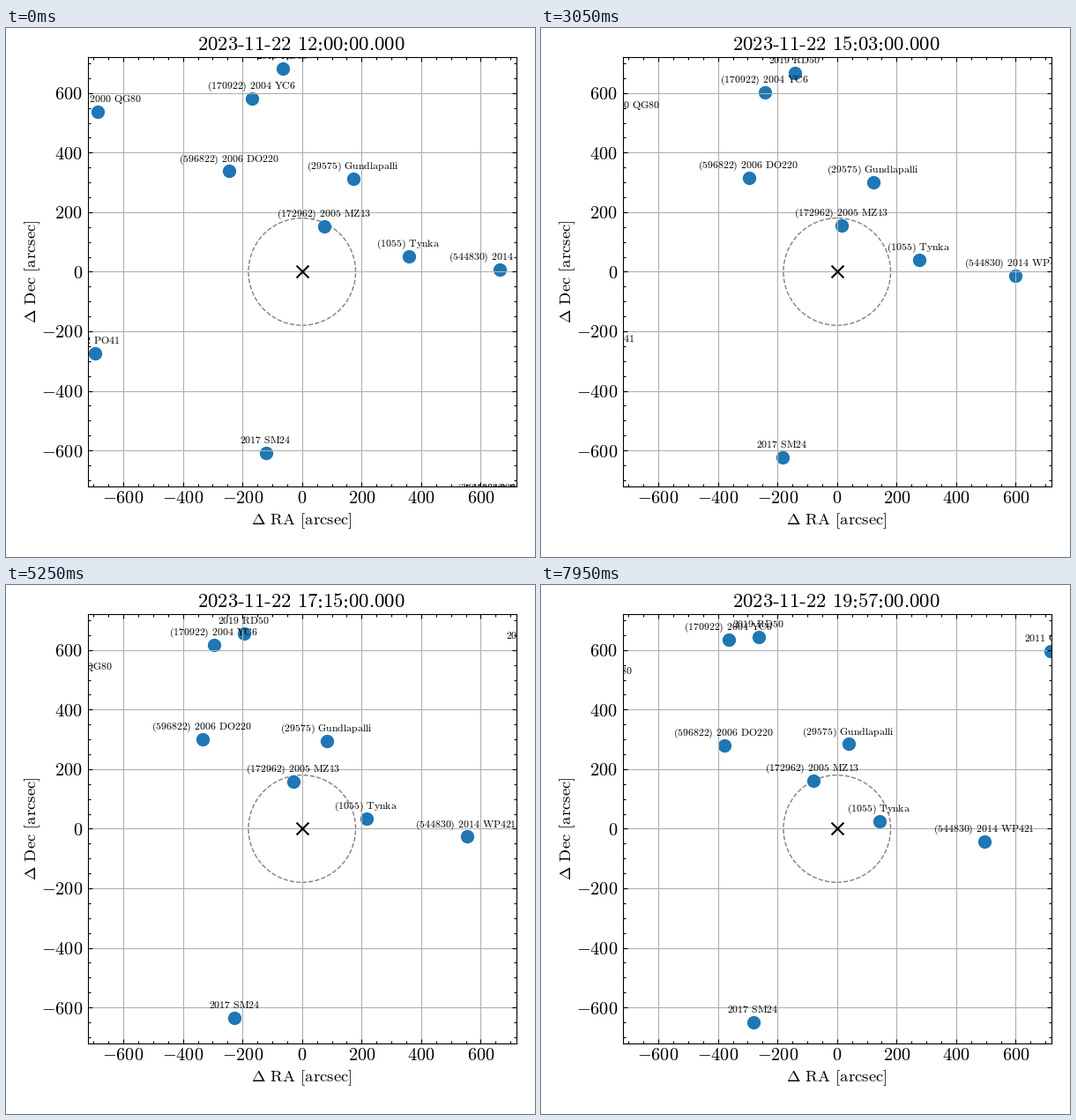
A matplotlib script that plays this animation: 600x600 px, repeating every 8000 ms.

```python
import numpy as np
import matplotlib.pyplot as plt
from matplotlib.animation import FuncAnimation
from matplotlib.lines import Line2D
from matplotlib.patches import Circle
from matplotlib.ticker import FuncFormatter, MultipleLocator
from matplotlib.transforms import ScaledTranslation

plt.rcParams["mathtext.fontset"] = "cm"

SIZE, DPI = 600, 100
FRAMES, INTERVAL = 160, 50
MINUTES_PER_FRAME = 3
LIMIT = 720

# label, first (RA, Dec) and last (RA, Dec) in arcsec
BODIES = [
    ("2019 RD50", (-64, 681), (-264, 643)),
    ("(170922) 2004 YC6", (-167.3, 582), (-362.6, 635.7)),
    ("(86324) 2000 QG80", (-686.4, 536.4), (-834.6, 486)),
    ("2002 PO41", (-695, -275), (-869, -257.7)),
    ("(596822) 2006 DO220", (-245, 337.3), (-379.7, 281)),
    ("(29575) Gundlapalli", (172.6, 312.1), (40.1, 284)),
    ("(172962) 2005 MZ13", (75.1, 151.2), (-80.5, 162.5)),
    ("(1055) Tynka", (358.9, 51.1), (141.7, 24.7)),
    ("(544830) 2014 WP421", (665.3, 7.2), (495.8, -44.3)),
    ("2017 SM24", (-120.5, -608.8), (-280.2, -649.4)),
    ("2011 CQ40", (879.5, 621.7), (718, 595)),
    ("(354198) 2014 OO65", (681, -768), (527, -792)),
    ("(251982) 2009 UB52", (713.6, -768), (559.5, -792)),
]
START = np.array([b[1] for b in BODIES], float)
END = np.array([b[2] for b in BODIES], float)

# Advance of each mark in em; \hspace counts in italic m widths
ADVANCE = {"-": 0.333, " ": 0.333, ":": 0.278, ".": 0.278}
M_WIDTH = 0.878


def roman(s, gaps=" "):
    for c in gaps:
        s = s.replace(c, r"\hspace{%.3f}" % (ADVANCE[c] / M_WIDTH))
    return r"$\mathrm{" + s + "}$"


def put(x, y, s, size, ha="center", **kw):
    """Text on a baseline, in pixels from the top left."""
    return fig.text(x / SIZE, 1 - y / SIZE, s, size=size, ha=ha,
                    va="baseline", **kw)


def stroke(xs, ys, **kw):
    """Black line or dots, in pixels from the top left."""
    fig.add_artist(Line2D(np.array(xs) / SIZE, 1 - np.array(ys) / SIZE,
                          color="black", **kw))


fig = plt.figure(figsize=(SIZE / DPI, SIZE / DPI), dpi=DPI, facecolor="white")
SIDE = 486.36
ax = fig.add_axes([92.57 / SIZE, 80.4 / SIZE, SIDE / SIZE, SIDE / SIZE])
ax.set(xlim=(-LIMIT, LIMIT), ylim=(-LIMIT, LIMIT))
for axis in (ax.xaxis, ax.yaxis):
    axis.set_major_locator(MultipleLocator(200))
    axis.set_minor_locator(MultipleLocator(50))
    axis.set_major_formatter(
        FuncFormatter(lambda v, _: r"$\mathrm{%.0f}$" % v))
ax.tick_params(which="both", direction="in", top=True, right=True, width=0.8)
ax.tick_params(which="major", length=3.5, labelsize=14.6)
ax.tick_params(which="minor", length=2)
ax.tick_params(axis="y", which="major", pad=4)
ax.grid(color="#b0b0b0", lw=0.8)

DELTA = r"$\Delta\hspace{0.38}\mathrm{%s\hspace{0.38}[arcsec]}$"
put(335.4, 563, DELTA % "RA", 13.45)
put(34.5, 276.5, DELTA % "Dec", 13.45, rotation=90, rotation_mode="anchor")

ax.add_patch(Circle((0, 0), 180, fill=False, ec="gray", ls="--", lw=1))
ax.scatter([0], [0], s=100, marker="x", c="black", lw=1.5, zorder=3)
dots = ax.scatter(START[:, 0], START[:, 1], s=100, c="#1f77b4", lw=1, zorder=1)

above = ax.transData + ScaledTranslation(-0.5 / 72, 8 / 72,
                                         fig.dpi_scale_trans)
labels = [ax.text(*p, roman(name), size=8.5, ha="center", va="baseline",
                  transform=above, clip_on=True) for name, p, _ in BODIES]


def stamp(i):
    h, m = divmod(i * MINUTES_PER_FRAME, 60)
    return f"2023-11-22 {12 + h:02d}:{m:02d}:00.000"


# Digits are one text with gaps; hyphens and colons are drawn in the gaps
TITLE_PT, BASE = 16.35, 25
EM = TITLE_PT * DPI / 72
steps = [ADVANCE.get(c, 0.5) * EM for c in stamp(0)]
left = 334.3 - sum(steps) / 2
title = put(left, BASE, roman(stamp(0), "- :"), TITLE_PT, ha="left")
pen = left
for c, step in zip(stamp(0), steps):
    if c == "-":
        y = BASE - 0.216 * EM
        stroke([pen + 0.011 * EM, pen + 0.276 * EM], [y, y],
               lw=0.058 * TITLE_PT, solid_capstyle="butt")
    elif c == ":":
        x = pen + step / 2
        stroke([x, x], [BASE - 0.06 * EM, BASE - 0.371 * EM], ls="",
               marker="o", ms=0.12 * TITLE_PT, mew=0)
    pen += step


def update(i):
    pos = START + (END - START) * i / (FRAMES - 1)
    dots.set_offsets(pos)
    for label, p in zip(labels, pos):
        label.set_position(p)
    title.set_text(roman(stamp(i), "- :"))
    return [dots, *labels, title]


anim = FuncAnimation(fig, update, frames=FRAMES, interval=INTERVAL,
                     repeat=True, repeat_delay=0, blit=False)
plt.show()
```
